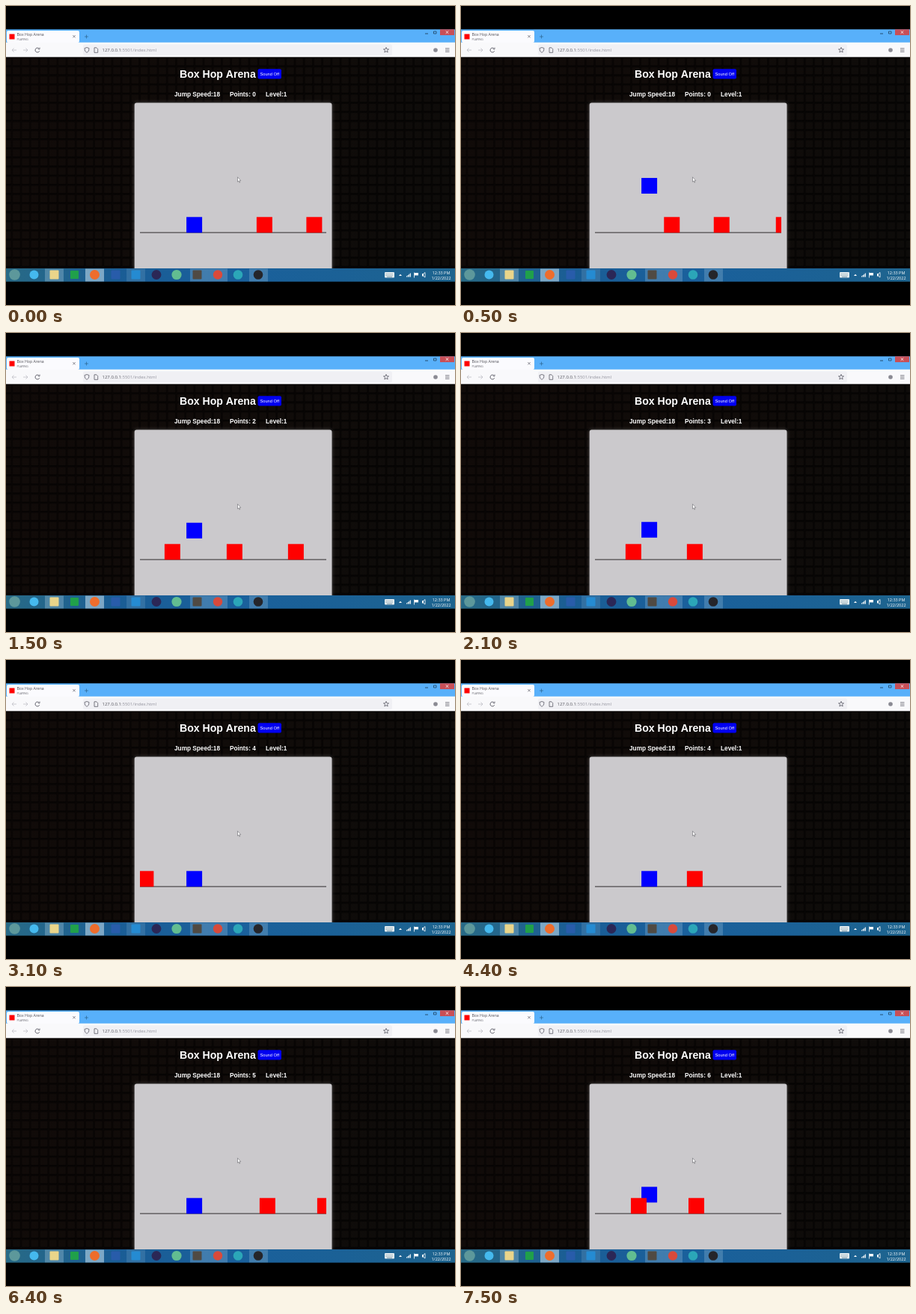
Write an HTML page with a canvas that moves like this. It is 600x400 px and loops after 7800 ms.

```html
<!DOCTYPE html>
<html lang="en">
<head>
<meta charset="utf-8">
<title>Box Hop Arena</title>
<style>
html, body { margin: 0; width: 100%; height: 100%; overflow: hidden; background: #000; }
canvas { display: block; width: 600px; height: 400px; }
</style>
</head>
<body>
<canvas id="stage" width="600" height="400"></canvas>
<script>
const W = 600, H = 400, LOOP = 7800;
const SANS = '"Liberation Sans", Arial, sans-serif';
const UI = '"Open Sans", "Noto Sans", sans-serif';
const ctx = document.getElementById('stage').getContext('2d');
const backdrop = document.createElement('canvas');
backdrop.width = W;
backdrop.height = H;

// The recording is 16:9, letterboxed on the stage
const TOP = 31.25, BOTTOM = 368.75, PAGE = 68.3, BAR = 351;

// Game geometry
const LEFT = 179, RIGHT = 428, FLOOR = 303.3, SIZE = 21, HERO_X = 241.1;
const JUMP_HEIGHT = 70, JUMP_TIME = 600, CRASH = 7320, SCORE_X = 246;
const jumps = [352, 970, 1573, 2280, 4570, 6754];
const cubes = [335, 401.5, 484.5, 566.5, 857, 1147, 1224];
// [time, distance scrolled]
const track = [[0, 0], [900, 114.5], [2100, 264.5], [3100, 390],
  [4400, 555], [6400, 808], [CRASH, 920], [LOOP, 920]];

function rect(g, x, y, w, h, color, r = 0) {
  g.fillStyle = color;
  g.beginPath();
  g.roundRect(x, y, w, h, r);
  g.fill();
}

function disc(g, x, y, r, color) {
  g.fillStyle = color;
  g.beginPath();
  g.arc(x, y, r, 0, 7);
  g.fill();
}

function path(g, points, color, width = 0.8) {
  g.strokeStyle = color;
  g.lineWidth = width;
  g.beginPath();
  points.forEach(([x, y]) => g.lineTo(x, y));
  g.stroke();
}

function text(g, str, x, y, font, color = '#fff') {
  g.font = font;
  g.fillStyle = color;
  g.fillText(str, x, y);
}

function gradient(g, x0, y0, x1, y1, colors) {
  const fill = g.createLinearGradient(x0, y0, x1, y1);
  colors.forEach((c, i) => fill.addColorStop(i / (colors.length - 1), c));
  return fill;
}

function drawBrowser(g) {
  const ink = '#5b5b66', faint = '#bdbdc4';
  rect(g, 0, TOP, W, 19, '#58b0fa');
  rect(g, 1, 33, 97, 16, '#fbfbfe', 2);
  rect(g, 4.5, 37.5, 7, 7, '#f00');
  text(g, 'Box Hop Arena', 14.5, 40.3, '5.2px ' + UI, '#4c4c54');
  text(g, 'PLAYING', 14.5, 45.6, '3.8px ' + UI, '#66666e');
  path(g, [[89.3, 39], [92.7, 42.4]], ink, 0.7);
  path(g, [[92.7, 39], [89.3, 42.4]], ink, 0.7);
  path(g, [[105, 41], [110, 41]], '#24587f', 0.6);
  path(g, [[107.5, 38.5], [107.5, 43.5]], '#24587f', 0.6);

  path(g, [[560, 37], [564, 37]], '#17344d', 0.8);
  path(g, [[571.5, 34], [575, 34], [575, 37], [571.5, 37], [571.5, 34]], '#17344d', 0.7);
  rect(g, 580, TOP, 19, 7.8, '#c84f57');
  path(g, [[587.7, 33.3], [591.3, 36.9]], '#fff');
  path(g, [[591.3, 33.3], [587.7, 36.9]], '#fff');

  rect(g, 0, 48.7, W, 20, '#f9f9fb');
  rect(g, 103, 51.5, 413, 14.5, '#f0f0f4', 2);
  path(g, [[14, 59], [8, 59]], faint);
  path(g, [[10.5, 56.5], [8, 59], [10.5, 61.5]], faint);
  path(g, [[23, 59], [29, 59]], faint);
  path(g, [[26.5, 56.5], [29, 59], [26.5, 61.5]], faint);
  g.strokeStyle = ink;
  g.lineWidth = 0.9;
  g.beginPath();
  g.arc(42, 59, 3, 0.4, 5.6);
  g.stroke();
  path(g, [[45, 55.5], [45, 57.8], [42.8, 57.8]], ink);

  path(g, [[108, 55.5], [111, 56.5], [110.5, 60], [108, 62.5],
    [105.5, 60], [105, 56.5], [108, 55.5]], ink);
  path(g, [[118, 55.8], [121, 55.8], [122.7, 57.5], [122.7, 62.3],
    [118, 62.3], [118, 55.8]], ink);
  text(g, '127.0.0.1', 128.5, 61.2, '6px ' + UI, '#55555c');
  const host = g.measureText('127.0.0.1').width;
  text(g, ':5501/index.html', 128.5 + host, 61.2, '6px ' + UI, '#94949e');

  const star = [];
  for (let i = 0; i <= 10; i++) {
    const r = i % 2 ? 1.6 : 3.7, a = i * Math.PI / 5 - Math.PI / 2;
    star.push([508 + r * Math.cos(a), 59 + r * Math.sin(a)]);
  }
  path(g, star, ink);
  disc(g, 574, 59, 2.8, '#8a8a93');
  for (const y of [56.8, 59, 61.2]) path(g, [[587, y], [592.5, y]], ink);
}

function drawPage(g) {
  g.save();
  g.beginPath();
  g.rect(0, PAGE, W, BAR - PAGE);
  g.clip();
  rect(g, 0, PAGE, W, BAR - PAGE, gradient(g, 0, PAGE, W, BAR, ['#0a0605', '#080504', '#070605']));
  const tile = gradient(g, 0, PAGE, W, BAR,
    ['rgba(66,46,36,.11)', 'rgba(64,50,40,.15)', 'rgba(58,52,46,.12)']);
  for (let y = 70; y < BAR; y += 12.2) {
    for (let x = -3; x < W; x += 12.2) {
      rect(g, x, y, 9.4, 9.4, tile, 1);
      rect(g, x, y + 9.4, 10.4, 1.3, 'rgba(0,0,0,.4)');
    }
  }

  text(g, 'Box Hop Arena', 232, 95.5, 'bold 14.1px ' + SANS);
  rect(g, 336.5, 84.2, 31.5, 13.3, '#0000f0', 2);
  text(g, 'Sound Off', 339.5, 93, '5.7px ' + SANS);
  text(g, 'Jump Speed:18', 225, 121, 'bold 8.25px ' + SANS);
  text(g, 'Level:1', 347, 121, 'bold 8.25px ' + SANS);

  g.shadowColor = 'rgba(120,115,115,.7)';
  g.shadowBlur = 4;
  rect(g, 171.7, 129.5, 263.8, 230, '#cbc9cc', 3);
  g.restore();
  rect(g, LEFT, 302.6, RIGHT - LEFT, 1.1, '#4c4a4d');
}

function drawTaskbar(g) {
  rect(g, 0, BAR, W, BOTTOM - BAR, gradient(g, 0, 0, W, 0,
    ['#286a86', '#1a5d95', '#1a609c', '#1b6196', '#1e648e']));
  for (const [x, a] of [[52, .25], [106, .5], [161, .12], [246, .2], [271, .2], [325, .2]]) {
    rect(g, x, 351.5, 25, 17, `rgba(220,240,250,${a})`);
  }
  const discs = [[11.5, 7.3, '#5d989b'], [37.5, 6, '#45b9ee'], [118.5, 6.5, '#ee6d2c'],
    [201, 6.4, '#2b2756'], [228, 6.6, '#62bd91'], [283, 6.2, '#d94a3b'],
    [310, 6.3, '#2ba6b8'], [337, 6.3, '#25252a']];
  discs.forEach(([x, r, c]) => disc(g, x, 359.5, r, c));
  const squares = [[58.5, 12, '#ead58a'], [86, 11, '#20a04a'], [140.5, 12, '#285caa'],
    [167.5, 12, '#258bd2'], [249.5, 12, '#504a43']];
  squares.forEach(([x, s, c]) => rect(g, x, 359.5 - s / 2, s, s, c, 1));

  rect(g, 506, 356, 13, 7.5, '#e3ecef', 1);
  for (const y of [358, 360]) {
    for (let x = 507.5; x < 517; x += 2) rect(g, x, y, 1, 0.8, '#58798b');
  }
  rect(g, 509, 361.9, 7, 0.7, '#58798b');
  g.fillStyle = '#fff';
  g.beginPath();
  g.moveTo(525, 361);
  g.lineTo(527, 358.8);
  g.lineTo(529, 361);
  g.fill();
  for (let i = 0; i < 4; i++) rect(g, 535 + i * 1.6, 361.2 - i * 1.2, 1.1, 1.2 + i * 1.2, '#fff');
  path(g, [[545.5, 356.5], [545.5, 363.5]], '#fff');
  rect(g, 546, 357, 5, 3.4, '#fff');
  rect(g, 556, 358, 2, 3.5, '#fff');
  path(g, [[558, 358], [560, 356.5], [560, 363], [558, 361.5]], '#fff');
  g.textAlign = 'center';
  text(g, '12:33 PM', 581.5, 358.5, '5.5px ' + UI);
  text(g, '1/22/2022', 581.5, 366, '5.5px ' + UI);
  g.textAlign = 'left';
}

function drawCursor(g) {
  const tip = [[309.5, 228.8], [309.5, 235.2], [310.9, 234], [311.8, 236.2],
    [312.8, 235.8], [311.9, 233.7], [313.7, 233.5]];
  g.beginPath();
  tip.forEach(([x, y]) => g.lineTo(x, y));
  g.closePath();
  g.fillStyle = '#fff';
  g.fill();
  g.strokeStyle = '#66656b';
  g.lineWidth = 0.6;
  g.stroke();
}

function scrolled(t) {
  const i = track.findIndex(([end]) => end > t);
  const [t0, d0] = track[i - 1], [t1, d1] = track[i];
  return d0 + (d1 - d0) * (t - t0) / (t1 - t0);
}

function heroHeight(t) {
  const now = Math.min(t, CRASH);
  const start = jumps.find(s => now >= s && now < s + JUMP_TIME);
  if (start === undefined) return 0;
  const p = (now - start) / JUMP_TIME;
  return 4 * JUMP_HEIGHT * p * (1 - p);
}

function draw(t) {
  const d = scrolled(t), top = FLOOR - SIZE;
  const places = cubes.map(x => x - d);
  const points = places.filter(x => x < SCORE_X).length;
  ctx.drawImage(backdrop, 0, 0);
  text(ctx, 'Points: ' + points, 299, 121, 'bold 8.25px ' + SANS);
  ctx.save();
  ctx.beginPath();
  ctx.rect(LEFT, 130, RIGHT - LEFT, 200);
  ctx.clip();
  rect(ctx, HERO_X, top - heroHeight(t), SIZE, SIZE, '#00f');
  places.forEach(x => rect(ctx, x, top, SIZE, SIZE, '#f00'));
  ctx.restore();
  drawCursor(ctx);
}

const base = backdrop.getContext('2d');
rect(base, 0, 0, W, H, '#000');
drawBrowser(base);
drawPage(base);
drawTaskbar(base);

const began = performance.now();
function frame() {
  draw((performance.now() - began) % LOOP);
  requestAnimationFrame(frame);
}
frame();
</script>
</body>
</html>
```
